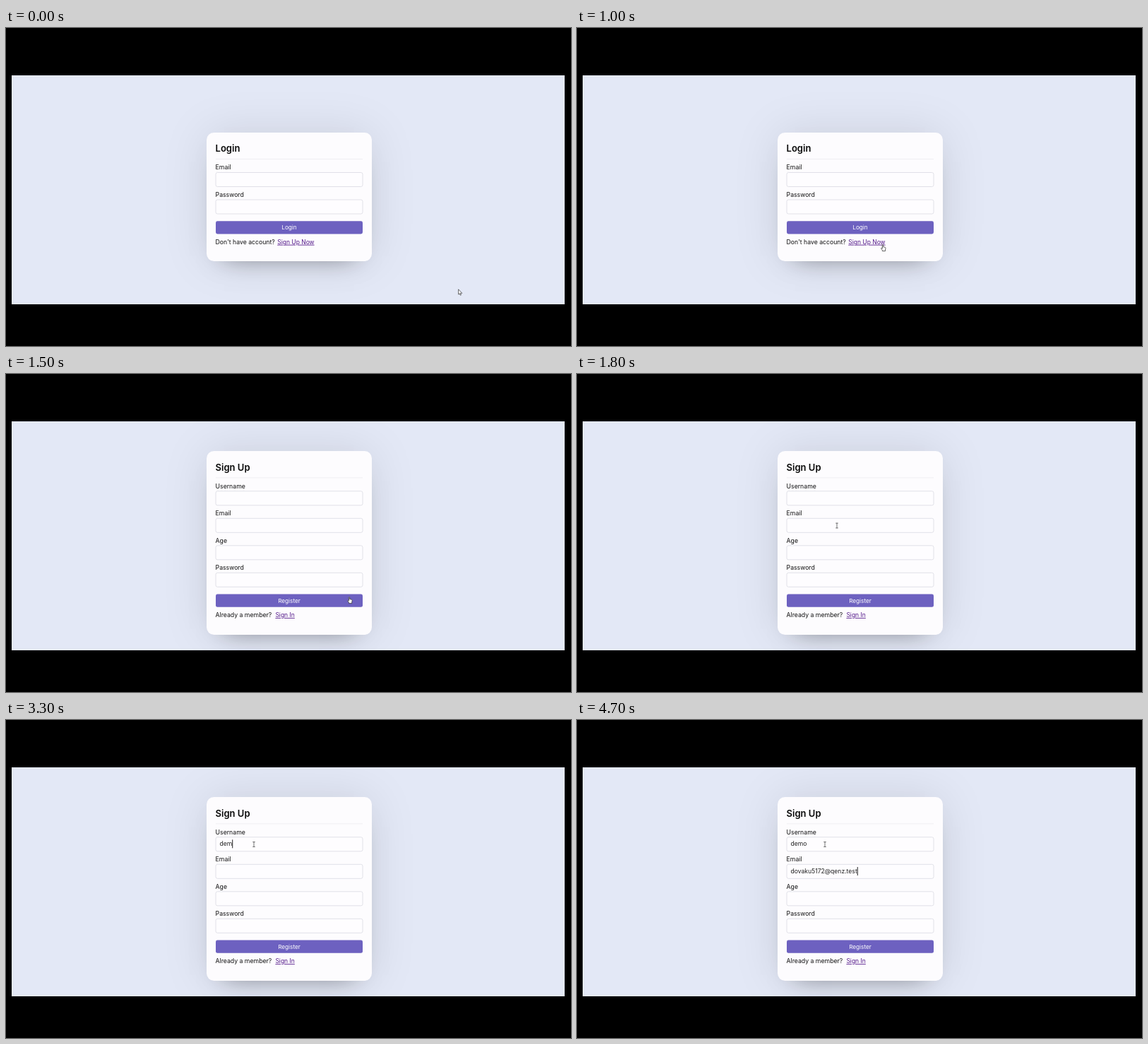
An HTML page for the animation above (5000 ms loop, 800 by 450 pixels).

```html
<!DOCTYPE html>
<html lang="en">
<head>
<meta charset="utf-8">
<title>Login and sign up</title>
<style>
  html, body { margin: 0; width: 100%; height: 100%; overflow: hidden; background: #000; }
  #page { position: absolute; left: 7.5px; top: 67px; width: 783px; height: 324px; overflow: hidden; background: #e3e8f6; }
  #card {
    position: absolute; left: 276.2px; width: 234px; border-radius: 10.4px; background: #fdfcfe;
    box-shadow: 0 0 66.5px rgba(0, 0, 0, .1), 0 16.6px 33.3px -25px rgba(0, 0, 0, .5);
  }
  svg { position: absolute; left: 0; top: 0; }
  text { font: 8.7px Inter, "Open Sans", sans-serif; fill: #111; white-space: pre; }
  .title { font-size: 13px; font-weight: 600; fill: #080808; }
  .btn { font-size: 8.2px; fill: #fff; text-anchor: middle; }
  .link { font-size: 8.5px; fill: #551a8b; text-decoration: underline; }
  .value { font-size: 8.6px; fill: #222; }
</style>
</head>
<body>
<div id="page"><div id="card"></div></div>
<svg width="800" height="450" viewBox="0 0 800 450">
  <g id="login"></g>
  <g id="signup"></g>
  <text id="user" class="value" x="302.4" y="178.2"></text>
  <text id="mail" class="value" x="302.4" y="216.9"></text>
  <rect id="caret" width="1" height="12" fill="#222"/>
  <g id="pointer" stroke-linejoin="round" stroke-linecap="round">
    <path id="arrow" d="M0 0V6.8L1.6 5.5 2.7 8 3.8 7.5 2.7 5.1H4.8Z" fill="#fff" stroke="#333" stroke-width=".7"/>
    <path id="hand" d="M-1.6 -4.2Q-.9 -5.2 -.3 -4.2V-1.4L2.5 -.7Q3.3 -.4 3.2 .6L2.7 3V4.6H-1.5V3.4L-3.3 .8Q-3.2 -.3 -1.6 .6Z" fill="#fff" stroke="#333" stroke-width=".75"/>
    <path id="beam" d="M-1.4 -3.4H1.4M-1.4 3.4H1.4M0 -3.4V3.4" fill="none" stroke="#555" stroke-width=".8"/>
  </g>
</svg>
<script>
const LOOP = 5000, STEP = 100;
const NAME = "demo", MAIL = "dovaku5172@qenz.test";
const $ = id => document.getElementById(id);

const text = (s, x, y, cls = "") => `<text class="${cls}" x="${x}" y="${y}">${s}</text>`;

const rect = (y, h, style) => `<rect x="297" y="${y}" width="208" height="${h}" rx="2.4" ${style}/>`;

// Builds one form downward from the top edge of its card.
function form(top, title, fields, button, note, link, linkX) {
  const rows = fields.map((label, i) => {
    const y = top + 52.3 + i * 38.5;
    return text(label, 296.6, y) + rect(y + 4.2, 20, 'fill="#fefdff" stroke="#dadae2" stroke-width=".8"');
  }).join("");
  const end = top + 48 + fields.length * 38.5;
  return text(title, 296.6, top + 27.3, "title") +
    `<path d="M297 ${top + 37.5}H505" stroke="#ececf0" stroke-width=".8"/>` + rows +
    rect(end + .3, 18.2, 'fill="#6d61c0"') +
    text(button, 401, end + 12.4, "btn") +
    text(note, 296.6, end + 32.7) + text(link, linkX, end + 32.7, "link");
}

$("login").innerHTML = form(148, "Login", ["Email", "Password"], "Login", "Don't have account?", "Sign Up Now", 384.2);
$("signup").innerHTML = form(109.3, "Sign Up", ["Username", "Email", "Age", "Password"], "Register", "Already a member?", "Sign In", 381.4);

// Pointer stops: time, shape, x, y.
const STOPS = [
  [0, "arrow", 640.6, 370.2], [100, "arrow", 582, 354], [200, "arrow", 522, 337],
  [500, "arrow", 480, 324], [600, "beam", 378, 304], [700, "beam", 351, 303],
  [800, "hand", 390, 306], [900, "hand", 420, 309], [1000, "hand", 433.8, 311],
  [1200, "hand", 437, 313], [1300, "hand", 450, 317], [1400, "hand", 470, 320],
  [1500, "hand", 487, 320], [1600, "hand", 494, 320],
  [1700, "beam", 428, 257], [1800, "beam", 368, 214.5], [1900, "beam", 357, 190],
  [2000, "beam", 352, 178], [2100, "beam", 351, 176]
];

// Caret changes: time, field ("" hides it).
const CARETS = [[0, ""], [2200, "user"], [2800, ""], [3100, "user"], [3800, ""], [3900, "mail"], [4400, ""], [4700, "mail"]];

const at = (list, t) => list.filter(k => k[0] <= t).pop();
const show = (id, on) => $(id).setAttribute("visibility", on ? "visible" : "hidden");

function draw(ms) {
  const t = Math.floor(ms % LOOP / STEP) * STEP;
  const joined = t >= 1100;
  show("login", !joined);
  show("signup", joined);
  $("card").style.top = (joined ? 42.2 : 81) + "px";
  $("card").style.height = (joined ? 259.5 : 182) + "px";

  const typed = Math.max(0, Math.min(NAME.length, (t - 3000) / STEP));
  $("user").textContent = NAME.slice(0, typed);
  $("mail").textContent = t >= 4700 ? MAIL : "";

  const field = at(CARETS, t)[1];
  show("caret", field);
  if (field) {
    $("caret").setAttribute("x", 302.4 + $(field).getComputedTextLength());
    $("caret").setAttribute("y", field === "user" ? 169.3 : 208);
  }

  const [, shape, x, y] = at(STOPS, t);
  for (const id of ["arrow", "hand", "beam"]) show(id, id === shape);
  $("pointer").setAttribute("transform", `translate(${x} ${y})`);
}

const start = performance.now();
function tick() {
  draw(performance.now() - start);
  requestAnimationFrame(tick);
}
tick();
</script>
</body>
</html>
```
